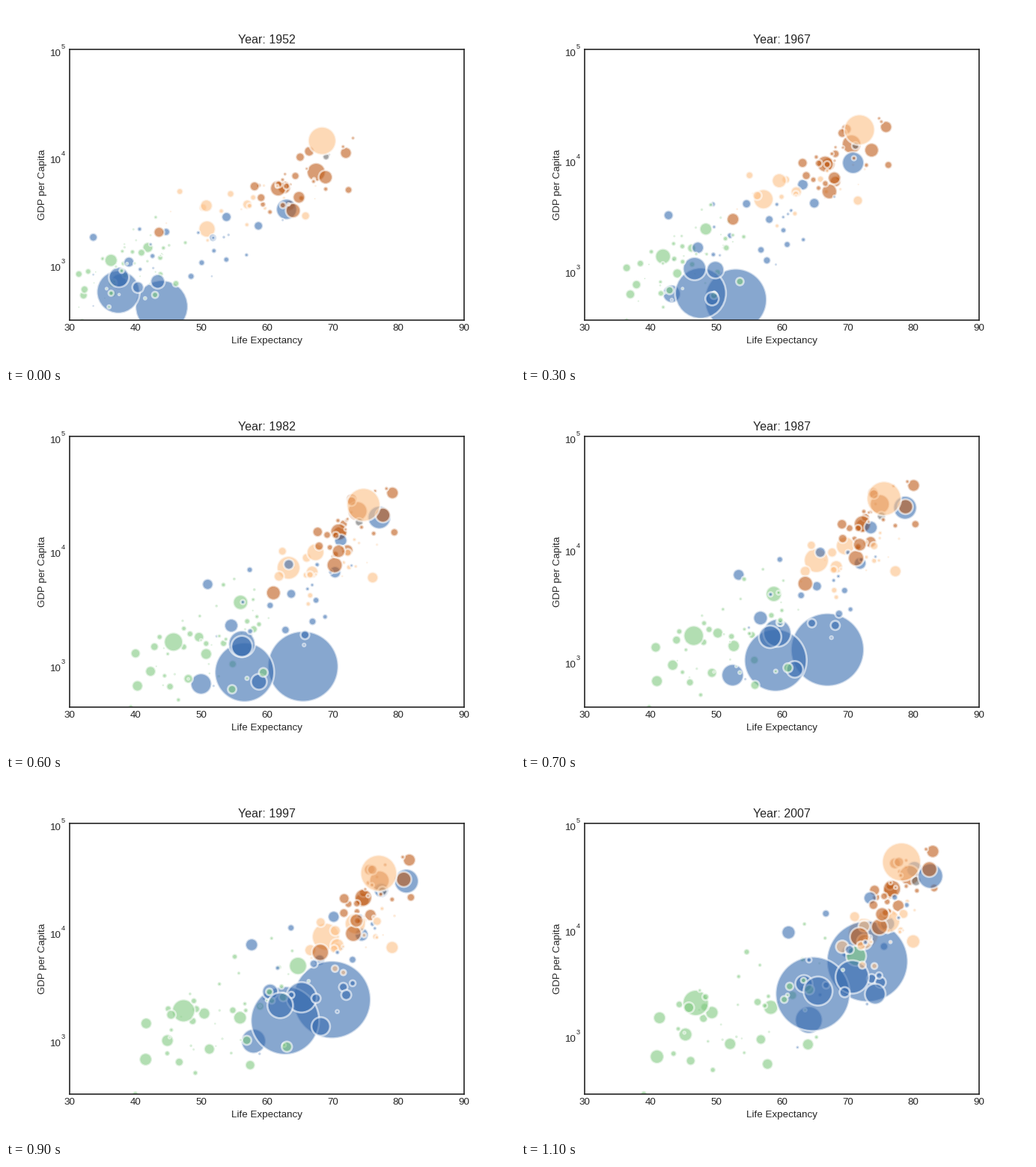
These frames come from a looping animation (680 by 480 pixels, 1.2 s). A matplotlib script:

```python
import numpy as np
import matplotlib.pyplot as plt
from matplotlib.animation import FuncAnimation

DPI = 96
INK = "0.15"
YEARS = np.arange(1952, 2008, 5)
T = YEARS - 1952
COLORS = dict(africa="#7fc97f", americas="#fdc086", asia="#386cb0",
              europe="#bf5b17", oceania="#666666")

# Largest bubbles, back to front: population in millions, life expectancy, GDP.
LARGE = [
    ("asia", (46.9, 150), (37.5, 50, 64.1), (684, 677, 1391)),
    ("americas", (56.6, 190), (50.9, 63.3, 72.4), (2109, 7031, 9066)),
    ("asia", (556, 1000, 1319), (44, 44.5, 63.1, 65.5, 73), (400, 962, 4959)),
    ("africa", (22.2, 80.3), (41.9, 56, 71.3), (1419, 3503, 5581)),
    ("europe", (69.1, 82.4), (67.5, 73.8, 79.4), (7144, 22032, 32170)),
    ("asia", (372, 708, 1110), (37.4, 56.6, 64.7), (547, 856, 2452)),
    ("asia", (82, 223), (37.5, 56.2, 70.7), (750, 1517, 3541)),
    ("asia", (86.5, 127), (63, 77.1, 82.6), (3217, 19384, 31656)),
    ("americas", (30.1, 109), (50.8, 67.4, 76.2), (3478, 9611, 11978)),
    ("africa", (33.1, 135), (36.3, 45.8, 46.9), (1077, 1577, 2014)),
    ("asia", (41.3, 169), (43.4, 56.2, 65.5), (685, 1443, 2606)),
    ("europe", (22.2, 71.2), (43.6, 61, 71.8), (1969, 4241, 8458)),
    ("americas", (158, 301), (68.4, 74.7, 78.2), (13990, 25010, 42952)),
    ("asia", (26.2, 85.3), (40.4, 58.8, 74.2), (605, 707, 2442)),
]

# The rest of each continent: count, largest population, ratio to the next one,
# growth, mean life and its spread, mean GDP and its spread (in decades).
CROWDS = {
    "africa": (50, 14, 0.92, 3.1, (39.5, 51, 54.5), (4.5, 8), (900, 1400, 1600), (0.25, 0.4)),
    "americas": (22, 18, 0.83, 2.6, (53, 66, 73), (8, 3.5), (3200, 6300, 8000), (0.18, 0.2)),
    "asia": (24, 22, 0.86, 2.7, (48, 63, 71), (8, 5.5), (1500, 4000, 7000), (0.25, 0.45)),
    "europe": (28, 50, 0.88, 1.25, (65, 73, 78), (4.5, 2.5), (5600, 15500, 25000), (0.2, 0.2)),
    "oceania": (2, 8.7, 0.23, 2.2, (69.2, 74.3, 80.7), (0.2, 0.4), (10200, 18500, 30000), (0.02, 0.06)),
}

# The y axis starts at the poorest country of each year.
FLOOR = (299, 336, 355, 349, 357, 371, 424, 385, 347, 312, 241, 278)


def track(keys):
    """Values over the years through two, three or five key points."""
    at = {2: (0, 55), 3: (0, 30, 55), 5: (0, 10, 20, 30, 55)}[len(keys)]
    logs = np.log10(keys)
    if len(keys) > 3:
        return 10 ** np.interp(T, at, logs)
    return 10 ** np.polyval(np.polyfit(at, logs, len(keys) - 1), T)


def drift(start, end):
    return start + (end - start) * T / T[-1]


def crowd(rng, count, top, ratio, growth, life, life_sd, gdp, gdp_sd):
    """Bubbles that scatter around their continent's mean path."""
    for k in range(count):
        size = top * ratio ** k
        health, wealth, turn = rng.normal(size=3).clip(-1.8, 1.8)
        dev = drift(health, 0.8 * health + 0.6 * turn)
        rich = 0.6 * dev + 0.8 * wealth
        yield (track((size, size * growth)),
               track(life) + dev * drift(*life_sd),
               track(gdp) * 10 ** (rich * drift(*gdp_sd)))


rng = np.random.default_rng(4)
rows = [(i / len(LARGE), group, [track(keys) for keys in paths])
        for i, (group, *paths) in enumerate(LARGE)]
for group, params in CROWDS.items():
    rows += [(rng.random(), group, paths) for paths in crowd(rng, *params)]
rows.sort(key=lambda row: row[0])
pop, life, gdp = np.array([row[2] for row in rows]).swapaxes(0, 1)
gdp = np.maximum(gdp, FLOOR)

plt.rcParams.update({
    "font.family": "Liberation Sans", "font.size": 10, "axes.titlesize": 12,
    "text.color": INK, "axes.labelcolor": INK, "axes.edgecolor": INK,
    "xtick.color": INK, "axes.linewidth": 1.25,
})
fig, ax = plt.subplots(figsize=(680 / DPI, 480 / DPI), dpi=DPI)
fig.subplots_adjust(left=0.125, right=0.9, bottom=0.125, top=0.88)
bubbles = ax.scatter(life[:, 0], gdp[:, 0], s=pop[:, 0] * 5,
                     c=[COLORS[row[1]] for row in rows],
                     alpha=0.6, edgecolors="white", linewidths=2)
ax.set_yscale("log")
ax.set_xlim(30, 90)
ax.tick_params(which="both", length=0)
ax.tick_params(axis="y", which="both", labelleft=False)
ax.set_xlabel("Life Expectancy")
ax.set_ylabel("GDP per Capita", labelpad=22.3)
title = ax.set_title("")

for power in (3, 4, 5):
    for text, offset, size in (("10", (-19.6, -6.8), 10), (power, (-8.4, 0.8), 7)):
        ax.annotate(str(text), (0, 10 ** power), offset, fontsize=size,
                    xycoords=ax.get_yaxis_transform(), textcoords="offset points")


def update(i):
    bubbles.set_offsets(np.column_stack([life[:, i], gdp[:, i]]))
    bubbles.set_sizes(pop[:, i] * 5)
    ax.set_ylim(FLOOR[i], 100000)
    title.set_text(f"Year: {YEARS[i]}")


anim = FuncAnimation(fig, update, frames=len(YEARS), interval=100,
                     repeat=True, repeat_delay=0)
plt.show()
```
